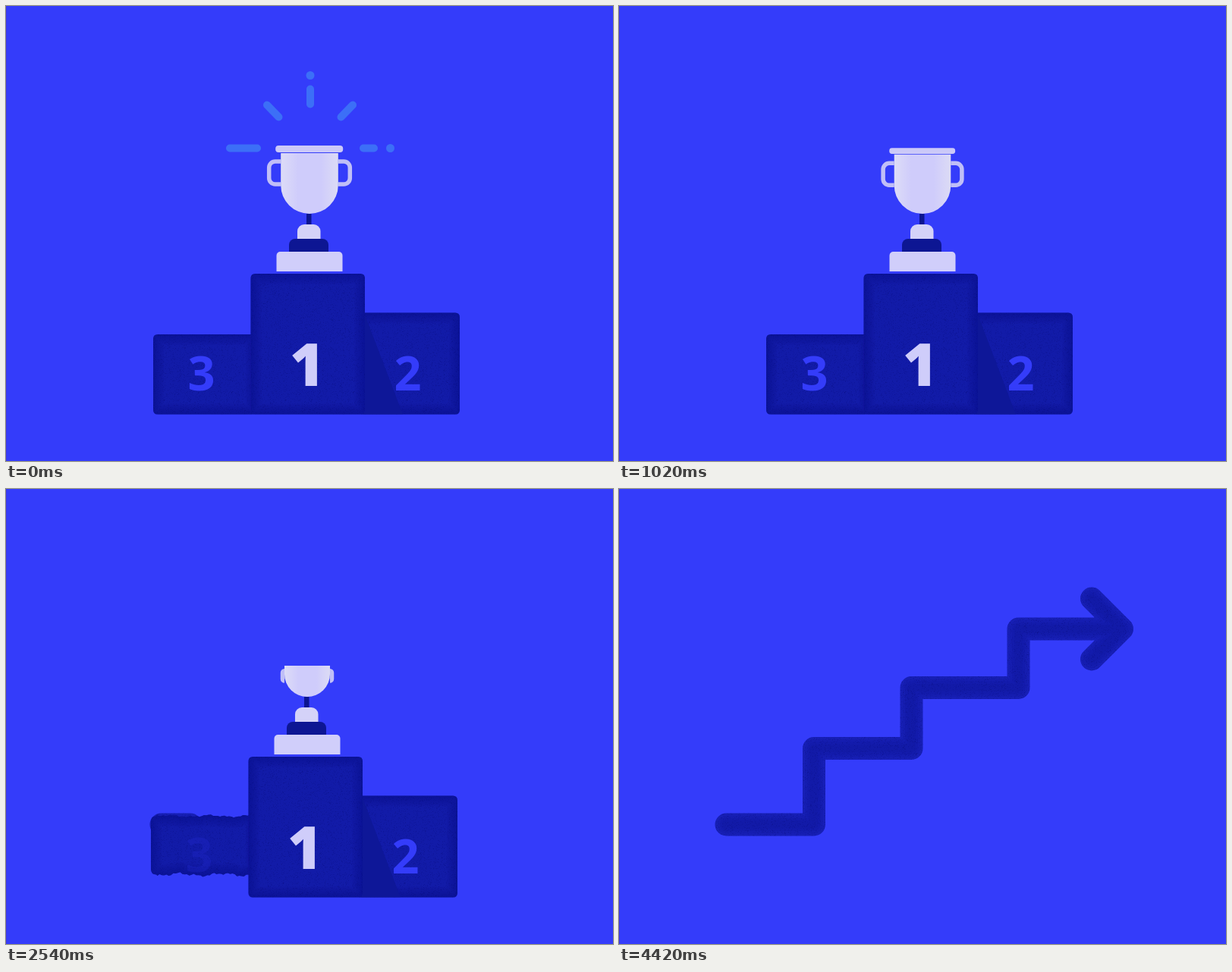
Write an HTML page with a canvas that moves like this. It is 800x600 px and loops after 4460 ms.

```html
<!DOCTYPE html>
<html lang="en">
<head>
<meta charset="utf-8">
<title>Podium and arrow</title>
<style>
html, body { margin: 0; width: 100%; height: 100%; overflow: hidden; background: #343cfa; }
canvas { display: block; width: 800px; height: 600px; }
</style>
</head>
<body>
<canvas id="stage" width="800" height="600"></canvas>
<script>
const ctx = document.getElementById('stage').getContext('2d');
const LOOP = 4460, POSTER = 100, STEP = 40, HOLD = 1500;
const BG = '#343cfa', INK = '#121ba8', DEEP = '#0c1590', PALE = '#cfcdfa', RAY = '#3c6ff7';
const FLOOR = 538.5;

const clamp = v => Math.min(1, Math.max(0, v));
const lerp = (a, b, k) => a + (b - a) * k;
const span = (t, a, d) => clamp((t - a) / d);
const easeOut = u => 1 - (1 - u) ** 3;
const easeBoth = u => u < 0.5 ? 4 * u ** 3 : 1 - 4 * (1 - u) ** 3;
const wave = x => Math.sin(x * 0.11) * 0.5 + Math.sin(x * 0.27 + 1) * 0.35 + Math.sin(x * 0.71) * 0.3;

const grain = makeGrain();

function makeGrain() {
  const c = document.createElement('canvas');
  c.width = c.height = 160;
  const g = c.getContext('2d');
  let seed = 7;
  const rnd = () => (seed = seed * 16807 % 2147483647) / 2147483647;
  for (let i = 0; i < 7000; i++) {
    g.fillStyle = `rgba(6,10,110,${rnd() * 0.22})`;
    g.fillRect(Math.floor(rnd() * 160), Math.floor(rnd() * 160), 1, 1);
  }
  return ctx.createPattern(c, 'repeat');
}

function pill(x0, y0, x1, y1, w, color) {
  ctx.beginPath();
  ctx.moveTo(x0, y0);
  ctx.lineTo(x1, y1);
  ctx.lineWidth = w;
  ctx.lineCap = 'round';
  ctx.strokeStyle = color;
  ctx.stroke();
}

function roundRect(x, y, w, h, r, color) {
  if (h <= 0 || w <= 0) return;
  ctx.beginPath();
  ctx.roundRect(x, y, w, h, r);
  ctx.fillStyle = color;
  ctx.fill();
}

// Block with rippling top and bottom edges
function block(b, inside) {
  const { x0, y0, x1, y1, top = 0, bottom = 0 } = b;
  if (y1 - y0 < 1) return;
  const r = Math.min(b.r || 6, (y1 - y0) / 2);
  ctx.save();
  ctx.beginPath();
  ctx.moveTo(x0, y0 + r);
  ctx.quadraticCurveTo(x0, y0, x0 + r, y0);
  for (let x = x0 + r; x < x1 - r; x += 3) ctx.lineTo(x, y0 + top * wave(x));
  ctx.lineTo(x1 - r, y0);
  ctx.quadraticCurveTo(x1, y0, x1, y0 + r);
  ctx.lineTo(x1, y1 - r);
  ctx.quadraticCurveTo(x1, y1, x1 - r, y1);
  for (let x = x1 - r; x > x0 + r; x -= 3) ctx.lineTo(x, y1 + bottom * wave(x + 40));
  ctx.lineTo(x0 + r, y1);
  ctx.quadraticCurveTo(x0, y1, x0, y1 - r);
  ctx.closePath();
  ctx.fillStyle = INK;
  ctx.fill();
  ctx.clip();
  ctx.lineJoin = 'round';
  ctx.strokeStyle = 'rgba(8,14,120,.06)';
  for (let w = 4; w <= 28; w += 4) {
    ctx.lineWidth = w;
    ctx.stroke();
  }
  ctx.fillStyle = grain;
  ctx.fill();
  if (inside) inside();
  ctx.restore();
}

// Places the visible centre of a digit at cx
function digit(text, cx, y, size, weight, color, alpha) {
  if (alpha <= 0) return;
  ctx.globalAlpha = alpha;
  ctx.font = `${weight} ${size}px "Open Sans", "Noto Sans", sans-serif`;
  ctx.textAlign = 'left';
  const m = ctx.measureText(text);
  ctx.fillStyle = color;
  ctx.fillText(text, cx - (m.actualBoundingBoxRight - m.actualBoundingBoxLeft) / 2, y);
  ctx.globalAlpha = 1;
}

const shown = (t, a, da, b, db) => span(t, a, da) * (1 - span(t, b, db));

// Rises from the floor, then shrinks up into a stair
function boxState(t, s) {
  const grow = easeOut(span(t, s.start, s.rise));
  const leave = easeBoth(span(t, s.end, s.fall));
  const mix = i => lerp(s.box[i], s.stair[i], leave);
  return {
    grow, leave,
    x0: mix(0), x1: mix(2), y1: mix(3),
    y0: leave ? mix(1) : lerp(FLOOR, s.box[1], grow),
    r: lerp(6, 9, leave),
    top: leave ? 2 * clamp(leave * 4) : grow < 1 ? 3 * clamp((1 - grow) * 5) : 0,
    bottom: leave ? 3 * clamp(leave * 4) : 0
  };
}

const THIRD = { start: 400, rise: 470, end: 2400, fall: 310, box: [194, 433, 330, FLOOR], stair: [194, 428, 337, 457] };
const FIRST = { start: 200, rise: 370, end: 2580, fall: 260, box: [322.5, 353, 473, FLOOR], stair: [309, 327, 466, 357] };
const SECOND = { start: 420, rise: 480, end: 2600, fall: 404, box: [465, 404.5, 598, FLOOR], stair: [454, 247, 598, 277] };

function podium(t) {
  const c = boxState(t, THIRD), b = boxState(t, SECOND), a = boxState(t, FIRST);
  if (c.leave < 1) {
    block(c);
    digit('3', 257.5, 507 + c.y0 - 433, 63, 700, BG, shown(t, 640, 160, 2380, 190));
  }
  if (b.leave < 1) {
    block(b, () => {
      ctx.globalAlpha = 1 - clamp(b.leave * 8);
      ctx.beginPath();
      ctx.moveTo(472, FLOOR - 134 * b.grow ** 2);
      ctx.lineTo(523, FLOOR);
      ctx.lineTo(465, FLOOR);
      ctx.fillStyle = '#0e1798';
      ctx.fill();
      ctx.globalAlpha = 1;
    });
    digit('2', 529.5, 507 + b.y0 - 404.5, 63, 700, BG, shown(t, 560, 170, 2600, 110));
  }
  if (a.leave < 1) {
    block(a);
    digit('1', 393.5, 501 + a.y0 - 353, 78, 800, PALE, shown(t, 400, 150, 2560, 110));
  }
}

function handle(side, top, h, w, edge) {
  const x = 400 + side * edge, out = x + side * w, r = Math.min(8, w);
  ctx.beginPath();
  ctx.moveTo(x, top);
  ctx.arcTo(out, top, out, top + r, r);
  ctx.arcTo(out, top + h, out - side * r, top + h, r);
  ctx.lineTo(x, top + h);
  ctx.lineWidth = 5.5;
  ctx.lineCap = 'butt';
  ctx.strokeStyle = '#c0bff7';
  ctx.stroke();
}

function cup(k, foot) {
  if (k <= 0.03) return;
  const half = 23.5 + 14.3 * k, top = foot - 90 * k;
  const rim = clamp((k - 0.75) / 0.25);
  const arm = clamp((k - 0.35) / 0.65);
  if (arm > 0) {
    for (const side of [-1, 1]) handle(side, top + lerp(4, 21, arm), lerp(10, 30, arm), 15.5 * arm, half);
  }
  const bodyTop = top + 10 * rim;
  const bend = Math.min(half, (foot - bodyTop) * 0.85);
  const fill = ctx.createLinearGradient(400 - half, 0, 400 + half, 0);
  fill.addColorStop(0, '#dddcf7');
  fill.addColorStop(0.3, '#cfccfb');
  fill.addColorStop(0.7, '#cfccfb');
  fill.addColorStop(1, '#dcdbf5');
  ctx.beginPath();
  ctx.moveTo(400 - half, bodyTop);
  ctx.lineTo(400 + half, bodyTop);
  ctx.lineTo(400 + half, foot - bend);
  ctx.ellipse(400, foot - bend, half, bend, 0, 0, Math.PI);
  ctx.closePath();
  ctx.fillStyle = fill;
  ctx.fill();
  if (rim > 0) {
    const w = lerp(half, 44.5, rim);
    roundRect(399.7 - w, top, w * 2, 9 * rim, 4 * rim, '#cbc9f8');
  }
}

function trophy(t) {
  const part = (a, b) => easeOut(span(t, a, 170)) * (1 - span(t, b, 90));
  const slab = part(640, 2610), dark = part(700, 2590), tier = part(750, 2570), stem = part(790, 2560);
  const slabY = 350 - 26 * slab, darkY = slabY - 17 * dark, tierY = darkY - 19 * tier, foot = tierY - 14 * stem;
  if (slab <= 0) return;
  roundRect(396, foot, 6.5, tierY - foot + 2, 0, DEEP);
  roundRect(384, tierY, 30.5, 19 * tier, [9 * tier, 9 * tier, 0, 0], '#d4d2f8');
  roundRect(373, darkY, 52, 17 * dark, [8 * dark, 8 * dark, 0, 0], '#0d1693');
  roundRect(356.5, slabY, 87, 26 * slab, [5 * slab, 5 * slab, 0, 0], '#d0cefa');
  const leave = span(t, 2300, 325) ** 2;
  cup(easeOut(span(t, 820, 300)) * (1 - leave), foot);
}

// Inner end, then outer end
const RAYS = [
  [331, 187.5, 295, 187.5], [359.5, 146.5, 344, 130.5], [401, 129.5, 401, 109.5],
  [441.5, 146.5, 457, 130.5], [471, 187.5, 485, 187.5]
];
const DOTS = [[401, 91.5], [506.5, 187.5]];

function rays(t) {
  const grow = easeOut(span(t, 1020, 190)), leave = easeBoth(span(t, 1860, 300));
  if (grow > 0 && leave < 1) {
    const w = 10 * Math.min(1, grow * 3, (1 - leave) * 3);
    for (const [x0, y0, x1, y1] of RAYS) {
      pill(lerp(x0, x1, leave), lerp(y0, y1, leave), lerp(x0, x1, grow), lerp(y0, y1, grow), w, RAY);
    }
  }
  const dot = easeOut(span(t, 1200, 120)) * (1 - span(t, 2040, 160));
  if (dot > 0) for (const [x, y] of DOTS) pill(x, y, x, y + 0.01, 11 * dot, RAY);
}

// Liquid rising from below: x, width, lean, head and tail at 620 ms
const STREAMS = [
  [253, 11, 6, 330, 561], [369, 15, -3, 300, 569], [364, 6, 0, 581, 592],
  [426, 18, 3, 557, 588], [405, 8, 0, 597, 612]
];

function streams(t) {
  if (t > 800) return;
  ctx.fillStyle = INK;
  for (const [x, w, lean, head, tail] of STREAMS) {
    const up = (t - 620) * 0.56;
    const y0 = Math.max(FLOOR - 4, head - up), y1 = tail - up;
    if (y0 > 604 || y1 <= FLOOR) continue;
    const mid = lerp(y0, y1, 0.5);
    ctx.beginPath();
    ctx.moveTo(x - w / 2, y0 + w / 3);
    ctx.quadraticCurveTo(x, y0 - w / 3, x + w / 2, y0 + w / 3);
    ctx.quadraticCurveTo(x + w / 2 + lean / 2, mid, x + lean + 2, y1);
    ctx.quadraticCurveTo(x + lean - 3, y1, x - w / 3 + lean / 2, mid);
    ctx.closePath();
    ctx.fill();
  }
}

// Loose drops pulled after the blocks: x, y, width, height at 2860 ms
const DROPS = [
  [490, 363, 11, 27], [517, 367, 6, 8], [530, 401.5, 4, 6], [557, 391, 5, 5],
  [302, 433, 5, 10], [376, 480, 5, 18], [442, 470, 3, 5]
];

function drops(t) {
  const size = shown(t, 2640, 90, 2880, 110);
  if (size <= 0) return;
  const dy = (2860 - t) * 0.55;
  ctx.fillStyle = '#1019a2';
  for (const [x, y, w, h] of DROPS) {
    ctx.beginPath();
    ctx.ellipse(x, y + dy, w / 2 * size, h / 2 * size, -0.1, 0, 7);
    ctx.fill();
  }
  ctx.beginPath();
  ctx.moveTo(446, 325 + dy);
  ctx.lineTo(456, 323 + dy);
  ctx.lineTo(456, lerp(325, 350, size) + dy);
  ctx.lineTo(459, lerp(325, 376, size) + dy);
  ctx.lineTo(453, lerp(325, 376, size) + dy);
  ctx.lineTo(450, lerp(325, 348, size) + dy);
  ctx.fill();
}

const STAIRS = [
  [207.5, 442.5], [323, 442.5], [323, 342], [451.5, 342],
  [451.5, 262], [592.5, 262], [592.5, 184.5], [729, 184.5]
];
const LENGTH = 779.5;

function stairs(t) {
  const u = t < 2856 ? span(t, 2269, 587) / 2 : 0.5 + span(t, 2856, 490) / 2;
  const len = easeBoth(u) * LENGTH;
  if (len < 0.5) return;
  let left = len, [x, y] = STAIRS[0];
  const line = new Path2D();
  line.moveTo(x, y);
  for (let i = 1; i < STAIRS.length && left > 0; i++) {
    const [nx, ny] = STAIRS[i];
    const d = Math.hypot(nx - x, ny - y), k = Math.min(1, left / d);
    x = lerp(x, nx, k);
    y = lerp(y, ny, k);
    line.lineTo(x, y);
    left -= d;
  }
  const head = 40 * clamp((len - 643) / 80);
  if (head > 0) {
    line.moveTo(x - head, y - head);
    line.lineTo(x, y);
    line.lineTo(x - head, y + head);
  }
  ctx.lineCap = ctx.lineJoin = 'round';
  const width = 30 * clamp(len / 10);
  ['#171fb5', '#151db0', '#131bac', '#121aa8'].forEach((color, i) => {
    ctx.lineWidth = width * (1 - i * 0.22);
    ctx.strokeStyle = color;
    ctx.stroke(line);
  });
  ctx.lineWidth = width;
  ctx.strokeStyle = grain;
  ctx.stroke(line);
}

function draw(t) {
  ctx.fillStyle = BG;
  ctx.fillRect(0, 0, 800, 600);
  ctx.fillStyle = '#3d38dc';
  ctx.fillRect(0, 0, 1, 600);
  const pan = -66 * easeBoth(span(t, 2307, 1035));
  ctx.save();
  ctx.translate(pan, 0);
  streams(t);
  stairs(t);
  podium(t);
  trophy(t);
  rays(t);
  ctx.restore();
  drops(t);
}

function tick() {
  const t = performance.now() % LOOP;
  draw(t < POSTER ? HOLD : POSTER + Math.floor((t - POSTER) / STEP) * STEP);
  requestAnimationFrame(tick);
}
tick();
</script>
</body>
</html>
```
